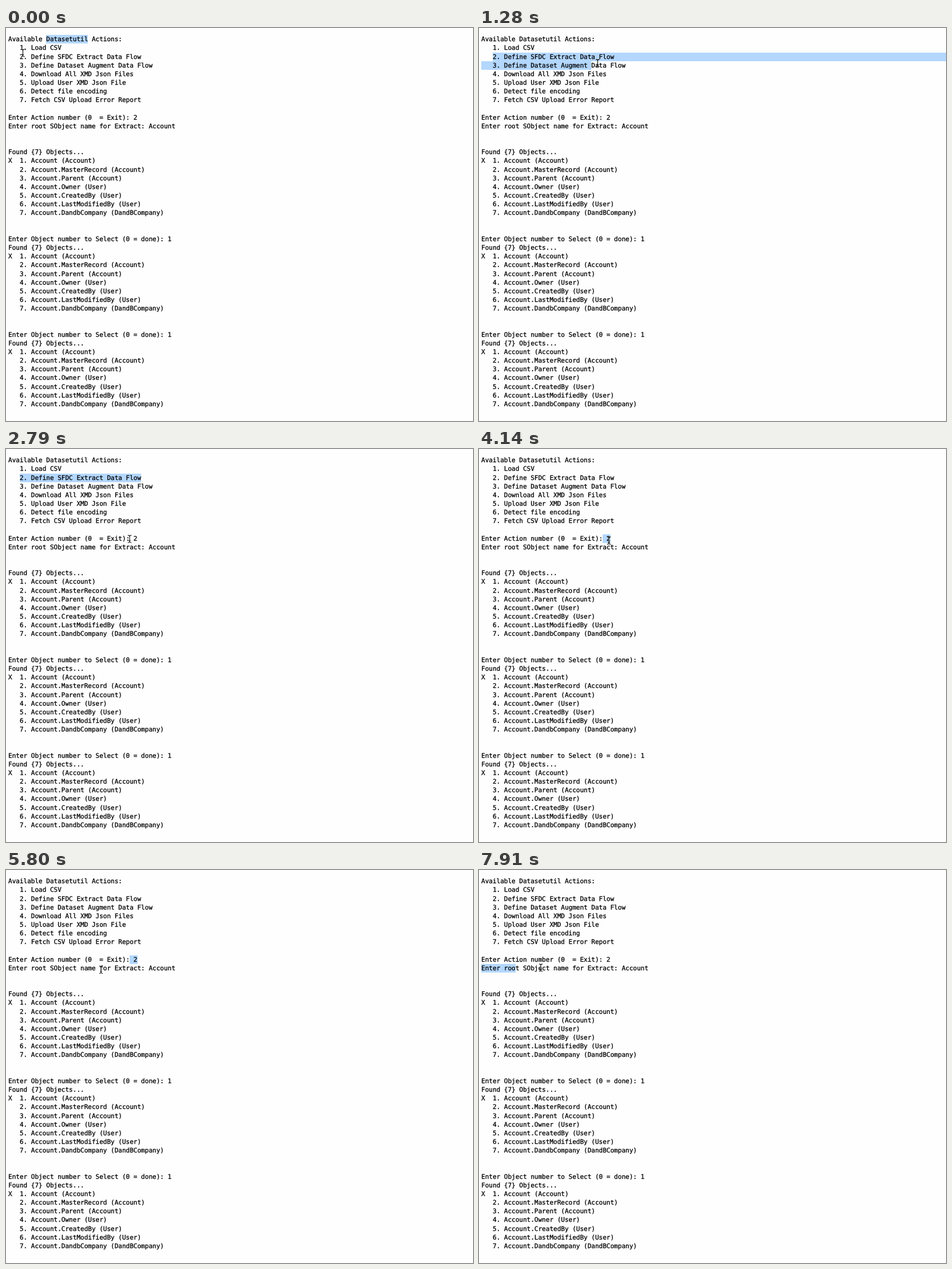
Write an HTML page that moves like this. It is 816 by 686 pixels and loops after 8 s.

```html
<!DOCTYPE html>
<html lang="en">
<head>
<meta charset="utf-8">
<title>Terminal selection</title>
<style>
  html, body { margin: 0; width: 100%; height: 100%; overflow: hidden; background: #fefefe; }
  #stage { position: relative; width: 816px; height: 686px; overflow: hidden; }
  pre {
    position: absolute; left: 4px; top: 12.3px; margin: 0; color: #000;
    font: 11.02px/15.155px "DejaVu Sans Mono", monospace;
    text-rendering: geometricPrecision; font-variant-ligatures: none;
    -webkit-text-stroke: .3px #000;
  }
  .mark { position: absolute; background: #b3d7fe; }
  svg { position: absolute; left: 0; top: 0; width: 816px; height: 686px; }
  #beam path { fill: none; stroke: #000; stroke-width: 1.1; }
  #beam .halo { stroke: #fff; stroke-width: 2.2; stroke-opacity: .6; }
</style>
</head>
<body>
<div id="stage">
  <div class="mark"></div>
  <div class="mark"></div>
  <pre></pre>
  <svg viewBox="0 0 816 686"><g id="beam"></g></svg>
</div>
<script>
const LOOP = 8000, TICK = 88.7;
const LEFT = 4, TOP = 12.3, CELL = 6.634, ROW = 15.155, WIDTH = 816;

const actions = `Available Datasetutil Actions:
   1. Load CSV
   2. Define SFDC Extract Data Flow
   3. Define Dataset Augment Data Flow
   4. Download All XMD Json Files
   5. Upload User XMD Json File
   6. Detect file encoding
   7. Fetch CSV Upload Error Report

Enter Action number (0  = Exit): 2
Enter root SObject name for Extract: Account


`;
const objects = `Found {7} Objects...
X  1. Account (Account)
   2. Account.MasterRecord (Account)
   3. Account.Parent (Account)
   4. Account.Owner (User)
   5. Account.CreatedBy (User)
   6. Account.LastModifiedBy (User)
   7. Account.DandbCompany (DandBCompany)
`;
const prompt = "\n\nEnter Object number to Select (0 = done): 1\n";
const text = actions + [objects, objects, objects].join(prompt);
const lines = text.split("\n");
document.querySelector("pre").textContent = text;

const marks = document.querySelectorAll(".mark");
const beam = document.getElementById("beam");
const outline = "M-3.2 -6.5Q-.3 -6.5 0 -4.5Q.3 -6.5 3.2 -6.5M0 -5V5" +
  "M-3.2 6.5Q-.3 6.5 0 4.5Q.3 6.5 3.2 6.5M-1.7 3H1.7";
beam.innerHTML = `<path class="halo" d="${outline}"/><path d="${outline}"/>`;

const steady = u => u;
const glide = u => u * u * (3 - 2 * u);
const settle = u => 1 - (1 - u) ** 2;
const rush = u => u ** 2.5;

const home = { x: 29.5, y: 43.5 };
const title = { row: 0, column: 10 };
const option = { row: 2, column: 3 };
const answer = { row: 9, column: 32 };
const question = { row: 10, column: 0 };

// Each move starts where the previous one ended; an anchor makes it a drag.
const moves = [
  { start: 90, end: 210, x: 26.5, y: 46.5, ease: steady },
  { start: 570, end: 1100, x: 193, y: 64, ease: steady, anchor: option },
  { start: 1190, end: 1370, x: 232.5, y: 56, ease: rush, anchor: option },
  { start: 1460, end: 1630, x: 245, y: 54, ease: settle, anchor: option },
  { start: 2080, end: 2430, x: 212, y: 169, ease: glide },
  { start: 2520, end: 2790, x: 216, y: 157, ease: glide },
  { start: 3150, end: 3330, x: 236, y: 157, ease: steady, anchor: answer },
  { start: 4140, end: 4760, x: 27.5, y: 223, ease: glide },
  { start: 5020, end: 5370, x: 272, y: 195, ease: rush },
  { start: 5460, end: 5800, x: 166, y: 174, ease: steady },
  { start: 5890, end: 6680, x: 20.5, y: 184, ease: glide },
  { start: 6770, end: 7300, x: 5, y: 171, ease: glide },
  { start: 7560, end: 7910, x: 108, y: 170.5, ease: rush, anchor: question },
];

function between(a, b, u) {
  return { x: a.x + (b.x - a.x) * u, y: a.y + (b.y - a.y) * u };
}

function cellAt({ x, y }) {
  const row = Math.floor((y - 1.5 - TOP) / ROW);
  const column = Math.round((x - LEFT) / CELL);
  return { row, column: Math.max(0, Math.min(column, lines[row].length)) };
}

function showMark(mark, row, x1, x2) {
  const top = Math.round(TOP + row * ROW);
  mark.style.left = x1 + "px";
  mark.style.top = top + "px";
  mark.style.width = Math.max(0, x2 - x1) + "px";
  mark.style.height = Math.round(TOP + (row + 1) * ROW) - top + "px";
}

function draw(t) {
  let origin = home, point = home;
  let from = title, to = { row: 0, column: 21 };
  for (const move of moves) {
    if (t < move.start) break;
    const { start, end, ease, anchor } = move;
    const steps = Math.round((end - start) / TICK) + 1;
    const interval = (end - start) / (steps - 1);
    const step = Math.min(steps - 1, Math.floor((t - start + 6) / interval));
    point = between(origin, move, ease((step + 1) / steps));
    if (anchor) {
      // The highlight trails the pointer by one step.
      from = anchor;
      to = cellAt(between(origin, move, ease(step / steps)));
    }
    origin = move;
  }
  const x1 = LEFT + from.column * CELL, x2 = LEFT + to.column * CELL;
  const wraps = to.row > from.row;
  showMark(marks[0], from.row, x1, wraps ? WIDTH : x2);
  showMark(marks[1], to.row, LEFT, wraps ? x2 : LEFT);
  beam.setAttribute("transform", `translate(${point.x} ${point.y})`);
}

function frame() {
  draw(performance.now() % LOOP);
  requestAnimationFrame(frame);
}
frame();
</script>
</body>
</html>
```
